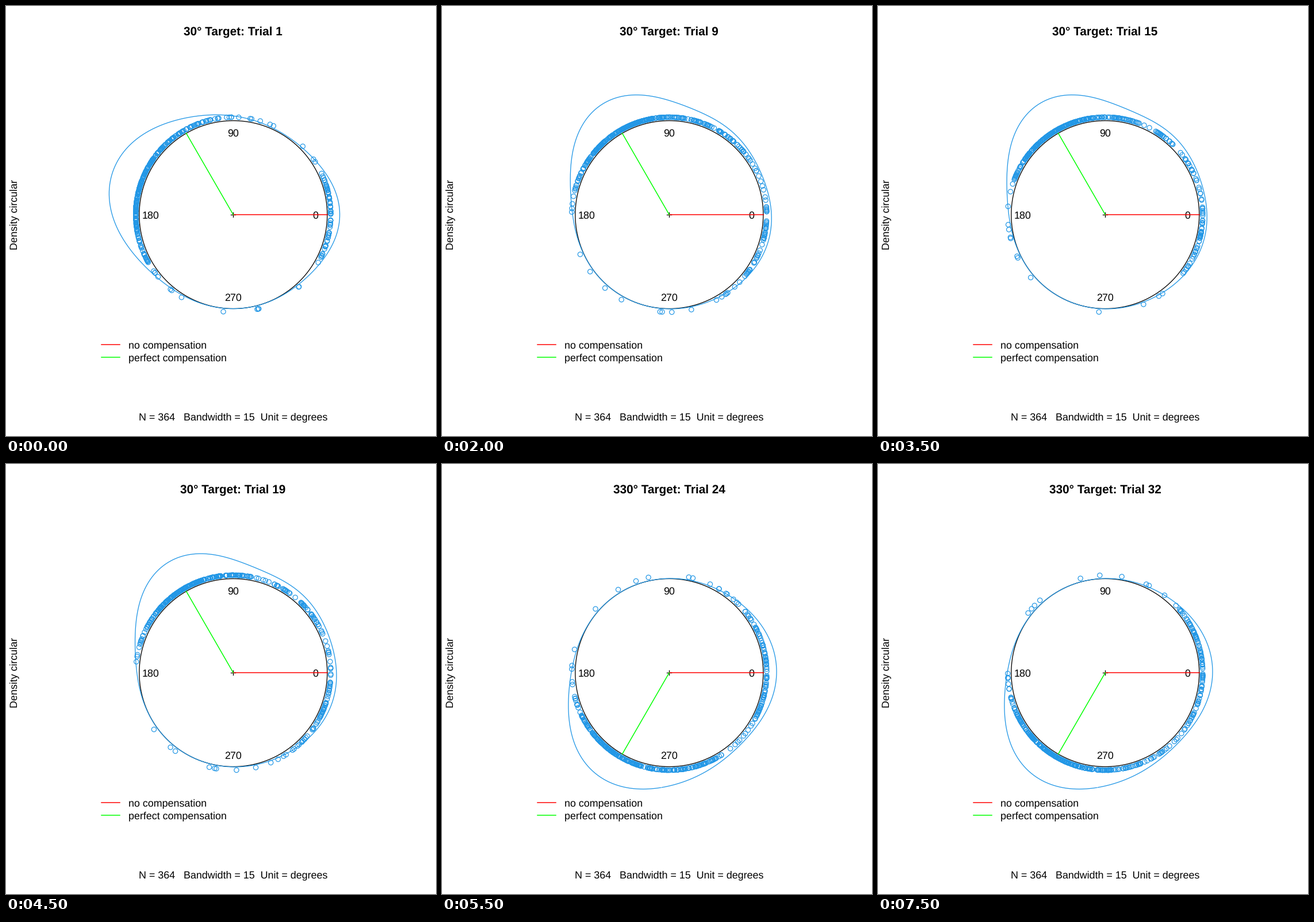
These frames come from a looping animation (748 by 748 pixels, 8 s). A matplotlib script:

```python
import numpy as np
import matplotlib.pyplot as plt
from matplotlib.animation import FuncAnimation

plt.rcParams["font.family"] = "Liberation Sans"
plt.rcParams["text.hinting"] = "none"

SIZE, DPI = 748, 100
PX = 72 / DPI
CX, CY, R = 395.3, 363, 163.5
R_POINTS = 169.6
BLUE = "#2297E6"
N, BANDWIDTH, STRAYS = 364, 15, 8
BLOCK = 20  # trials with the first target


def trial_at(i):
    return 2 * i + (1 if i < 10 else 2)


def bumps(trial):
    """Centres, heights and spreads: compensated, partial, uncompensated."""
    if trial > BLOCK:
        return np.array([(235.5, 285, 2), (.325, .07, .142), (27.5, 22, 31)])
    late = 1 - np.exp(-(trial - 1) / 2)
    slow = 1 - np.exp(-(trial - 1) / 4)
    keys = (1, 5, 11, 15, 19)
    main = np.interp(trial, keys, (.36, .32, .40, .372, .362))
    side = np.interp(trial, keys, (.133, .078, .098, .083, .10))
    return np.array([
        (160 - 40 * late, 100 - 50 * slow, -12 * late),
        (main, .03 + .06 * late, side),
        (30 - 4 * late, 22, 23 + 6 * late),
    ])


def density(deg, trial):
    total = 0
    for mu, height, sd in bumps(trial).T:
        d = (deg - mu + 180) % 360 - 180
        total = total + height * np.exp(-.5 * (d / sd) ** 2)
    return total


def responses(trial):
    rng = np.random.default_rng(trial)
    mu, height, sd = bumps(trial)
    weight = height * sd
    pick = rng.choice(3, N - STRAYS, p=weight / weight.sum())
    spread = np.sqrt(sd ** 2 - BANDWIDTH ** 2)
    quiet = (185, 300) if trial <= BLOCK else (60, 185)
    return np.concatenate([rng.normal(mu[pick], spread[pick]),
                           rng.uniform(*quiet, STRAYS)])


def polar(deg, radius):
    a = np.radians(deg)
    return CX + radius * np.cos(a), CY - radius * np.sin(a)


fig = plt.figure(figsize=(SIZE / DPI, SIZE / DPI), dpi=DPI, facecolor="white")
ax = fig.add_axes([0, 0, 1, 1])
ax.set(xlim=(0, SIZE), ylim=(SIZE, 0))
ax.axis("off")


def line(x, y, color, z=2, width=1.3):
    return ax.plot(x, y, color=color, lw=width * PX, zorder=z)[0]


def label(x, y, s, size=17.9, ha="center", **kw):
    return ax.text(x, y, s, fontsize=size * PX, ha=ha, va="baseline", **kw)


line(*polar(np.linspace(0, 360, 361), R), "black")
line([CX - 4, CX + 4], [CY, CY], "black")
line([CX, CX], [CY - 4, CY + 4], "black")
for x, y, s in [(538, 363, "0"), (395, 220, "90"), (252, 363, "180"), (395, 506, "270")]:
    label(x, y + 6.4, s)

title = label(395, 51, "", size=20.8, weight="bold")
label(395, 720.3, f"N = {N}   Bandwidth = {BANDWIDTH}  Unit = degrees")
label(19.5, 363, "Density circular", rotation=90, rotation_mode="anchor")
for y, color, s in [(589.3, "red", "no compensation"),
                    (610.6, "lime", "perfect compensation")]:
    line([166, 198], [y, y], color, width=1.5)
    label(213, y + 6.4, s, ha="left")

points = ax.scatter([], [], s=(8.2 * PX) ** 2, facecolors="none",
                    edgecolors=BLUE, linewidths=1.2 * PX, zorder=3)
curve = line([], [], BLUE, z=4)
line([CX, CX + R], [CY, CY], "red", z=5, width=1.5)
aim = line([], [], "lime", z=5, width=1.5)
THETA = np.linspace(266.4, 625.9, 720)


def draw(i):
    trial = trial_at(i)
    first = trial <= BLOCK
    title.set_text(f"{30 if first else 330}° Target: Trial {trial}")
    points.set_offsets(np.column_stack(polar(responses(trial), R_POINTS)))
    curve.set_data(*polar(THETA, R * (1 + density(THETA, trial))))
    x, y = polar(120 if first else 240, R)
    aim.set_data([CX, x], [CY, y])
    return title, points, curve, aim


anim = FuncAnimation(fig, draw, frames=16, interval=500, repeat=True,
                     repeat_delay=0, blit=False)
plt.show()
```
